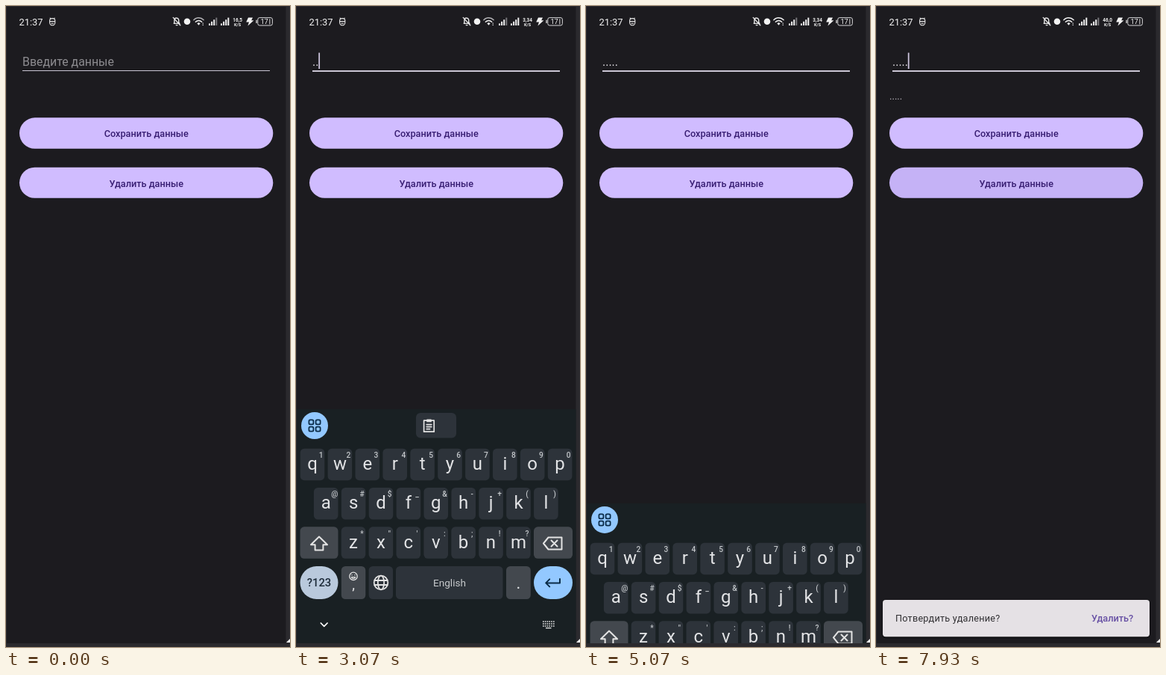
An HTML page for the animation above (8000 ms loop, 381 by 857 pixels).

```html
<!DOCTYPE html>
<html lang="ru">
<head>
<meta charset="utf-8">
<title>Saved note</title>
<style>
  html, body { margin: 0; width: 100%; height: 100%; overflow: hidden; background: #2b2a2e; }
  svg { display: block; width: 381px; height: 857px; font-family: Roboto, "Noto Sans", sans-serif; }
  .mid { text-anchor: middle; }
  .line { fill: none; stroke-linecap: round; stroke-linejoin: round; }
  .label { font-size: 12.7px; font-weight: 500; }
</style>
</head>
<body>
<svg id="stage" viewBox="0 0 381 857" xmlns="http://www.w3.org/2000/svg">
  <defs>
    <clipPath id="screen"><rect x="1" y="1" width="374.5" height="851"/></clipPath>
    <clipPath id="saveClip"><rect x="18" y="149.3" width="340.3" height="41.5" rx="20.75"/></clipPath>
    <clipPath id="deleteClip"><rect x="18" y="215.8" width="340.3" height="41" rx="20.5"/></clipPath>
  </defs>
  <rect width="381" height="857" fill="#2b2a2e"/>
  <rect x="1" y="1" width="374.5" height="851" fill="#1c1b1f"/>
  <path d="M381 846v5h-5z" fill="#fff"/>

  <g id="status" fill="#f2f2f2" stroke="none">
    <text x="17.5" y="25.6" font-size="12.9">21:37</text>
    <g class="line" stroke="#e8e8e8" stroke-width="1.1">
      <path d="M58.6 19.6v2.6a3.6 3.6 0 0 0 7.2 0v-2.6a3.6 3 0 0 0-7.2 0zM58.6 20.6h7.2M59.8 16.9l-.6-.7M64.6 16.9l.6-.7M60.8 23.2h2.8"/>
      <path d="M225.3 23.4h7.6l-1.2-1.6v-3a3 3 0 0 0-5.8-.8v3.8zM224.2 15.4l9.6 10.4M228.2 25.6h1.8" stroke-width="1.4"/>
    </g>
    <circle cx="243" cy="20.8" r="4.3"/>
    <g class="line" stroke="#f2f2f2" stroke-width="1.5">
      <path id="wifiOuter" d="M252 18.6a9 9 0 0 1 13 0"/>
      <path d="M254.4 21.2a5.6 5.6 0 0 1 8.2 0"/>
    </g>
    <path d="M256.4 23.2a3 3 0 0 1 4.2 0l-2.1 2.6z"/>
    <path d="M263.6 22.6h1.2v1.2h-1.2zm0 2.2h1.2v1.2h-1.2z"/>
    <g id="bars"></g>
    <g class="mid" font-weight="700" font-size="6.4">
      <text id="speed" x="310.6" y="21.4"></text>
      <text x="310.6" y="27" font-size="5.6">K/S</text>
    </g>
    <path d="M325 15.6h6l-1.8 3.6h3.2l-8 7.2 1.6-4.8h-3.8z"/>
    <rect x="337.8" y="15.6" width="19.6" height="10.4" rx="2.4" fill="none" stroke="#d6d6d8" stroke-width="1"/>
    <path d="M335.4 18.8h1.2v4.2h-1.2zM353.4 17.2h.9v7.2h-.9z"/>
    <text class="mid" x="346.6" y="24.2" font-size="9.2">17</text>
  </g>

  <text id="hint" x="22" y="80" font-size="15.9" fill="#8d8c90">Введите данные</text>
  <text id="typed" x="22" y="80" font-size="15.9" fill="#e4e1e6"></text>
  <rect id="cursor" y="62.5" width="1.8" height="21.5" fill="#cbc3dc"/>
  <rect id="underline" x="22" y="86" width="332" fill="#cac6d4"/>
  <text id="saved" x="18" y="125" font-size="13.1" fill="#cac5cd">.....</text>

  <g fill="#381e72" class="mid label">
    <rect x="18" y="149.3" width="340.3" height="41.5" rx="20.75" fill="#d0bcff"/>
    <circle id="saveRipple" cx="188" cy="170" clip-path="url(#saveClip)"/>
    <text x="188.2" y="175">Сохранить данные</text>
    <rect x="18" y="215.8" width="340.3" height="41" rx="20.5" fill="#d0bcff"/>
    <circle id="deleteRipple" cx="188" cy="236.5" clip-path="url(#deleteClip)"/>
    <text x="188.2" y="241.8">Удалить данные</text>
  </g>

  <g clip-path="url(#screen)">
    <g id="keyboard">
      <rect x="1" y="539" width="375" height="314" fill="#192023"/>
      <circle cx="25" cy="561" r="18" fill="#93c8ff"/>
      <g id="apps" class="line" stroke="#0b2c48" stroke-width="1.8"></g>
      <g id="chip">
        <rect x="161" y="544" width="54" height="33.5" rx="6" fill="#2d333a"/>
        <g class="line" stroke="#e3e3e3" stroke-width="1.7">
          <path d="M171.6 554.2h13.6v15h-13.6zM175.2 559.6h6.6M175.2 562.6h6.6M175.2 565.6h4.4"/>
          <path d="M176 553.4h5v2h-5z" fill="#e3e3e3"/>
        </g>
      </g>
      <g id="keys"></g>
      <g class="line" stroke="#e3e3e3" stroke-width="2">
        <path d="M31 709.5l11 10.8h-5.6v7.2H25.6v-7.2H20z"/>
        <path d="M338.5 710.5h18v16h-18l-6.5-8zM342.5 714.5l8 8m0-8l-8 8"/>
        <g stroke-width="1.3">
          <circle cx="77" cy="762.4" r="5.2"/>
          <path d="M74.4 763.6a2.7 2.7 0 0 0 5.2 0zM75 760.6v.3M79 760.6v.3"/>
        </g>
        <g stroke-width="1.8">
          <circle cx="114" cy="771" r="9.3"/>
          <ellipse cx="114" cy="771" rx="4.2" ry="9.3"/>
          <path d="M105.4 768h17.2M105.4 774h17.2"/>
        </g>
        <path d="M354 766v5.4h-18.6m4.8-5l-5 5 5 5" stroke="#0b2c48"/>
      </g>
      <rect id="navRipple" x="-8" y="803" width="90.5" height="49" rx="24.5" fill="#4a4b4c"/>
      <path class="line" d="M33.3 825l4.4 4.4 4.4-4.4" stroke="#fff" stroke-width="1.7"/>
      <path d="M331 823h15.6M331 826h15.6M331 829h15.6" stroke="#f0f0f0" stroke-width="1.5" stroke-dasharray="1.6 1.2"/>
      <path d="M335 831.6h7.5" stroke="#f0f0f0" stroke-width="1.2"/>
    </g>
  </g>

  <g id="snackbar">
    <rect x="8" y="793.5" width="360" height="52" rx="5" fill="#000" opacity=".35"/>
    <rect x="9" y="794" width="358" height="49.3" rx="4" fill="#e5e1e5"/>
    <text x="26" y="823.3" font-size="12.7" letter-spacing=".22" fill="#313033">Потвердить удаление?</text>
    <text class="label" x="289" y="823.3" fill="#6750a4">Удалить?</text>
  </g>
</svg>

<script>
const LOOP = 8000;
const FPS = 15;
const TAPS = [2530, 3070, 3235, 3400, 3570];
const $ = id => document.getElementById(id);
const clamp = v => Math.max(0, Math.min(1, v));
const progress = (t, start, length) => clamp((t - start) / length);
const easeOut = p => 1 - (1 - p) ** 3;
const between = (t, a, b) => t >= a && t < b;
const show = (id, on) => $(id).setAttribute('visibility', on ? 'visible' : 'hidden');

function add(parent, tag, attrs, text) {
  const node = document.createElementNS('http://www.w3.org/2000/svg', tag);
  for (const name in attrs) node.setAttribute(name, attrs[name]);
  if (text) node.textContent = text;
  return parent.appendChild(node);
}

function addKey(x, y, width, fill, height = 42.5, rx = 5.5) {
  return add($('keys'), 'rect', { x, y, width, height, rx, fill });
}

function addLabel(x, y, text, size, fill = '#e3e4e6', weight = 400) {
  add($('keys'), 'text', { x, y, class: 'mid', 'font-size': size, fill, 'font-weight': weight }, text);
}

const PITCH = 36.9, KEY = '#2d333a', SPECIAL = '#43484e';
[
  ['qwertyuiop', '1234567890', 22, 591.7],
  ['asdfghjkl', '@#$_&-+()', 40.2, 644],
  ['zxcvbnm', '*"\':;!?', 77, 696.3],
].forEach(([letters, hints, start, y]) => [...letters].forEach((letter, i) => {
  const x = start + i * PITCH;
  addKey(x - 16.3, y, 32.6, KEY);
  addLabel(x, y + 28.4, letter, 24);
  addLabel(x + 11.6, y + 12.4, hints[i], 10.2, '#c3c7ca', 500);
}));
addKey(5.5, 696.3, 51, SPECIAL);
addKey(319, 696.3, 52, SPECIAL);
addKey(5.5, 749, 51, '#b9c9dc', 44, 22);
addLabel(31, 776.2, '?123', 14.8, '#1d2b39', 500);
addKey(60.8, 749, 32.5, SPECIAL, 44);
addLabel(77, 780, ',', 19);
addKey(97.6, 749, 32.5, KEY, 44);
addKey(134, 749, 143.5, KEY, 44);
addLabel(206, 776, 'English', 13.6, '#c7cacc');
const dotKey = addKey(282, 749, 32.8, SPECIAL, 44);
addLabel(298.4, 779, '.', 22);
addKey(319, 749, 52, '#93c8ff', 44, 22);

for (const x of [17.4, 26.6])
  for (const y of [553.4, 562.6])
    add($('apps'), 'rect', { x, y, width: 6, height: 6, rx: 1.6 });

const bars = [272, 288].map(left => [0, 1, 2, 3].map(i => add($('bars'), 'rect', {
  x: left + i * 3.1, y: 23.4 - i * 2.6, width: 2, height: 2.6 + i * 2.6,
})));
const setBars = (set, level) =>
  set.forEach((bar, i) => bar.setAttribute('fill', i < level ? '#f2f2f2' : '#77767a'));

function drawRipple(id, t, start, end) {
  const ripple = $(id);
  ripple.setAttribute('r', 25 + 155 * easeOut(progress(t, start, 350)));
  ripple.setAttribute('opacity', .065 * progress(t, start - 40, 100) * (1 - progress(t, end, 220)));
}

// The caret restarts its half-second blink on focus and after each tap.
function caretVisible(t) {
  if (t < 1470) return false;
  const restart = TAPS.filter(tap => tap <= t).pop() ?? 1470;
  return Math.floor((t - restart) / 492) % 2 === 0;
}

function drawKeyboard(t) {
  const opening = easeOut(progress(t, 1470, 240));
  const closing = progress(t, 4975, 150) ** 2;
  show('keyboard', between(t, 1470, 5125));
  $('keyboard').setAttribute('transform', `translate(0 ${314 * (1 - opening + closing)})`);

  const grow = easeOut(progress(t, 1715, 330));
  show('chip', between(t, 1715, 5040));
  $('chip').setAttribute('opacity', progress(t, 1700, 130));
  $('chip').setAttribute('transform', `translate(188 561) scale(${grow}) translate(-188 -561)`);

  const pressed = TAPS.some(tap => between(t, tap - 90, tap));
  dotKey.setAttribute('fill', pressed ? '#60656b' : SPECIAL);
  show('navRipple', between(t, 4870, 5050));
  $('navRipple').setAttribute('opacity', .5 + .5 * progress(t, 4870, 60));
}

function render(t) {
  const focused = t >= 1470;
  const count = TAPS.filter(tap => tap <= t).length;

  $('speed').textContent = t < 1000 ? '16,5' : t < 6130 ? '3,34' : '46,0';
  $('wifiOuter').setAttribute('stroke', t < 4070 ? '#b4b3b6' : '#f2f2f2');
  setBars(bars[0], t < 7000 ? 3 : 4);
  setBars(bars[1], t < 7000 ? 4 : 3);

  show('hint', count === 0);
  $('typed').textContent = '.'.repeat(count);
  show('cursor', caretVisible(t));
  $('cursor').setAttribute('x', 21.9 + count * 4.18);
  $('underline').setAttribute('height', focused ? 2 : 1);
  show('saved', t >= 6000);

  drawRipple('saveRipple', t, 5870, 6450);
  drawRipple('deleteRipple', t, 7330, LOOP);
  drawKeyboard(t);

  const snack = progress(t, 7530, 150);
  $('snackbar').setAttribute('opacity', snack);
  $('snackbar').setAttribute('transform',
    `translate(188 818.5) scale(${.8 + .2 * easeOut(snack)}) translate(-188 -818.5)`);
}

function stepTime(t) {
  const step = Math.floor((t + 5) * FPS / 1000);
  return Math.round(step * 100 / FPS) * 10;
}

const begin = performance.now();
function tick() {
  render(stepTime((performance.now() - begin) % LOOP));
  requestAnimationFrame(tick);
}
tick();
</script>
</body>
</html>
```
